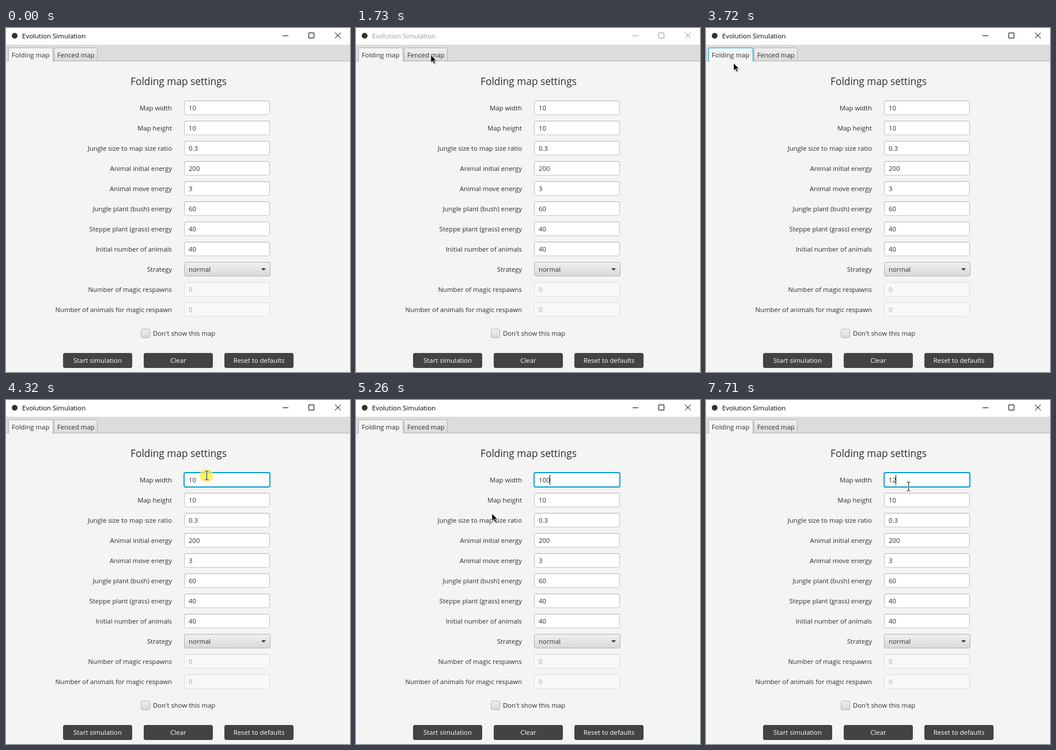
An HTML page that plays this animation: 597x597 px, repeating every 8000 ms.

```html
<!DOCTYPE html>
<html lang="en">
<head>
<meta charset="utf-8">
<title>Evolution Simulation</title>
<style>
html, body { margin: 0; width: 100%; height: 100%; overflow: hidden; background: #f4f4f4; }
svg { display: block; width: 597px; height: 597px; }
text { font: 11.35px "Open Sans", "Noto Sans", sans-serif; fill: #2e2e2e; white-space: pre; }
.head { font-size: 17.3px; }
.bar { font-size: 11.5px; }
.white { fill: #fff; }
.end { text-anchor: end; }
.mid { text-anchor: middle; }
.off { opacity: .4; }
</style>
</head>
<body>
<svg id="stage" viewBox="0 0 597 597">
  <defs>
    <linearGradient id="shade" x2="0" y2="1">
      <stop stop-color="#f0f0f0"/><stop offset="1" stop-color="#d9d9d9"/>
    </linearGradient>
    <linearGradient id="edge" x2="0" y2="1">
      <stop stop-color="#b3b3b3"/><stop offset="1" stop-color="#c8c8c8"/>
    </linearGradient>
  </defs>
  <rect width="597" height="597" fill="#f4f4f4"/>
  <rect width="597" height="29" fill="#fff"/>
  <rect y="29" width="597" height="28" fill="#dcdcdc"/>
  <rect y="57" width="597" height="1" fill="#b8b8b8"/>
  <circle cx="15" cy="13.5" r="5" fill="#333"/>
  <text id="caption" class="bar" x="28" y="18">Evolution Simulation</text>
  <path id="controls" d="M480 13.5h10M525.5 8.5h9v9h-9zM571 8l10 10m0-10l-10 10" fill="none"/>
  <g id="tabs"></g>
  <text id="heading" class="head mid" x="299.5" y="99"></text>
  <g id="form"></g>
  <g id="focus">
    <rect x="309" y="126" width="149" height="25" rx="2.5" fill="none" stroke="#039ed3" stroke-width="1.8"/>
    <rect id="caret" y="130" width="1" height="17"/>
  </g>
  <rect id="ring" x="379" y="564" width="120" height="26" rx="3" fill="none" stroke="#039ed3" stroke-width="1.6"/>
  <circle id="glow" r="11.5" fill="#ffee32" opacity=".72"/>
  <g id="arrow">
    <path d="M1.5 2.5v13l3-2.800 2 4.500 2.500-1-2-4.500h4z" fill="#000" opacity=".18"/>
    <path d="M0 0v13l3-2.800 2.200 4.800 2.200-1-2.200-4.600h4.100z" stroke="#fff" stroke-width=".7"/>
  </g>
  <g id="beam" fill="none">
    <path d="M-3-7.500h2.500l.5.500.5-.5H3M0-7V7M-3 7.500h2.500L0 7l.5.500H3" stroke="#fff" stroke-width="2.500"/>
    <path d="M-3-7.500h2.500l.5.500.5-.5H3M0-7V7M-3 7.500h2.500L0 7l.5.500H3" stroke="#111"/>
  </g>
</svg>
<script>
const $ = id => document.getElementById(id);
const text = (x, y, s, cls = '') => `<text x="${x}" y="${y}" class="${cls}">${s}</text>`;
const box = (x, y, w, h, fill, stroke) =>
  `<rect x="${x + .5}" y="${y + .5}" width="${w - 1}" height="${h - 1}" rx="2.5" fill="${fill}" stroke="${stroke}"/>`;

const rows = [
  ['Map width', 10], ['Map height', 10], ['Jungle size to map size ratio', 0.3],
  ['Animal initial energy', 200], ['Animal move energy', 3],
  ['Jungle plant (bush) energy', 60], ['Steppe plant (grass) energy', 40],
  ['Initial number of animals', 40], ['Strategy', 'normal'],
  ['Number of magic respawns', 0], ['Number of animals for magic respawn', 0]
];

function buildForm() {
  let out = '';
  rows.forEach(([label, value], i) => {
    const y = 126 + 35 * i, combo = i === 8;
    out += text(288, y + 17, label, 'end') + `<g class="${i > 8 ? 'off' : ''}">` +
      (combo ? box(309, y, 150, 25, 'url(#shade)', '#b4b4b4') + `<path d="M443 ${y + 11}h8l-4 4z" fill="#333"/>`
             : box(309, y, 149, 25, '#fff', 'url(#edge)')) +
      text(317, y + 17, value) + '</g>';
  });
  out += box(234, 522, 16, 16, 'url(#shade)', '#b4b4b4') + text(255, 534, "Don't show this map");
  ['Start simulation', 'Clear', 'Reset to defaults'].forEach((s, i) => {
    out += box(99 + 140 * i, 564, 120, 26, '#434343', '#434343') + text(159 + 140 * i, 581, s, 'white mid');
  });
  $('form').innerHTML = out;
}

const tabs = [[4, 78, 'Folding map'], [83, 76, 'Fenced map']];
function drawTabs(current, focused) {
  $('tabs').innerHTML = tabs.map(([x, w, s], i) => {
    const on = i === current, color = on && focused ? '#039ed3' : '#b4b4b4';
    return `<path d="M${x + .5} ${on ? 58 : 57}V37q0-2.500 2.500-2.500h${w - 6}q2.500 0 2.500 2.500V${on ? 58 : 57}"
      fill="${on ? '#f4f4f4' : 'url(#shade)'}" stroke="${color}"/>` + text(x + 6, 51, s);
  }).join('');
}

// Pointer path: tick, x, y
const path = [
  [17, 357, 556], [19, 250, 320], [21, 92, 46], [23, 131, 53], [25, 131, 53], [26, 130, 47],
  [41, 130, 47], [42, 126, 47], [44, 88, 38], [46, 13, 44], [47, 35, 45], [55, 35, 45],
  [56, 48, 61], [59, 125, 112], [62, 265, 154], [64, 355, 138], [65, 348, 131], [66, 340, 132],
  [68, 296, 128], [69, 296, 128], [72, 220, 172], [75, 187, 198], [79, 236, 197],
  [82, 235, 204], [83, 235, 204], [87, 285, 190], [91, 351, 150]
];
function pointer(n) {
  const i = path.findIndex(p => p[0] > n);
  if (i < 0) return path[path.length - 1].slice(1);
  const [a, x, y] = path[i - 1], [b, u, v] = path[i], k = (n - a) / (b - a);
  return [x + (u - x) * k, y + (v - y) * k];
}

// Latest value whose start tick has passed
const at = (n, steps) => steps.filter(s => s[0] <= n).pop()[1];
const within = (n, ...spans) => spans.some(([a, b]) => n >= a && n < b);
const show = (id, on) => $(id).style.display = on ? '' : 'none';

buildForm();
const width = $('form').querySelectorAll('text')[1];
const tick = 66.5;
let last = -1;

function draw(n) {
  const idle = within(n, [4, 33]), fenced = within(n, [33, 50]);
  $('caption').style.fill = idle ? '#999' : '#000';
  $('controls').setAttribute('stroke', idle ? '#999' : '#000');
  drawTabs(+fenced, within(n, [33, 65]));
  $('heading').textContent = (fenced ? 'Fenced' : 'Folding') + ' map settings';

  const value = at(n, [[0, '10'], [76, '100'], [99, '10'], [101, '1'], [106, ''], [116, '12']]);
  width.textContent = value;
  show('focus', n >= 65);
  show('caret', within(n, [70, 73], [76, 86], [96, 999]));
  $('caret').setAttribute('x', Math.floor(317 + 6.46 * value.length));
  show('ring', within(n, [1, 4]));

  const visible = n >= 17, [x, y] = visible ? pointer(n).map(Math.round) : [0, 0];
  const editing = x > 309 && x < 458 && y > 126 && y < 152;
  show('arrow', visible && !editing);
  show('beam', visible && editing);
  show('glow', within(n, [33, 35], [50, 52], [65, 68]));
  $('arrow').setAttribute('transform', `translate(${x} ${y})`);
  $('beam').setAttribute('transform', `translate(${x + .5} ${y})`);
  $('glow').setAttribute('transform', `translate(${x} ${y})`);
}

function loop() {
  const n = Math.floor((performance.now() % 8000 + 10) / tick);
  if (n !== last) draw(last = n);
  requestAnimationFrame(loop);
}
loop();
</script>
</body>
</html>
```
